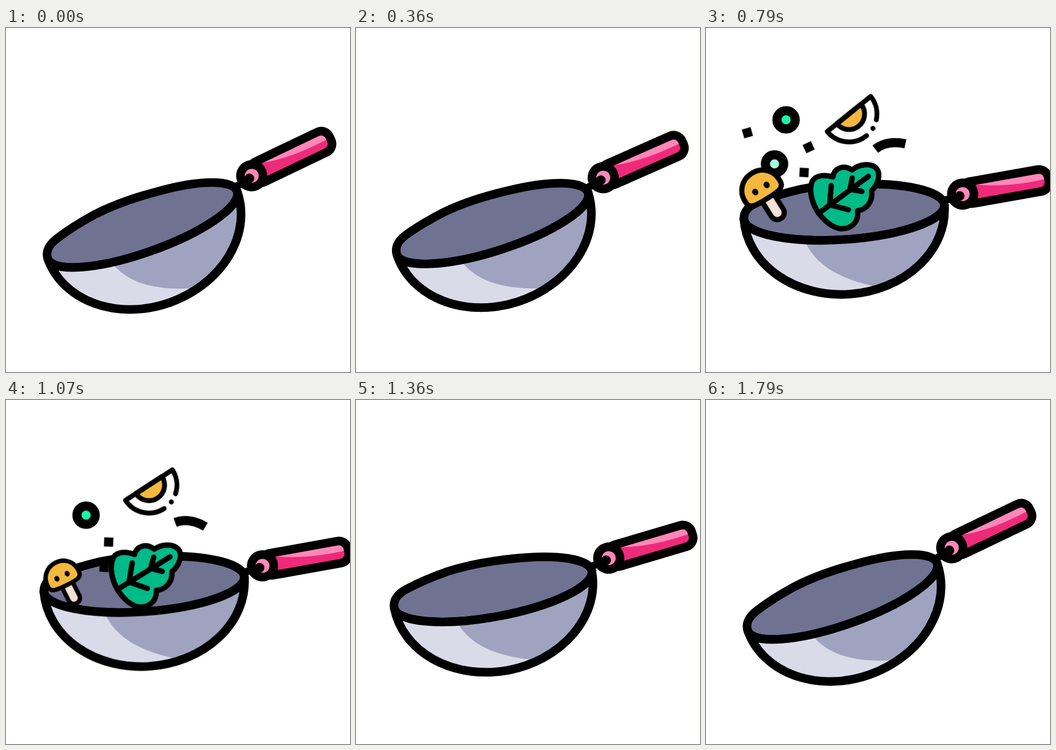
These frames come from a looping animation (640x640 px, 1.87 s). An HTML page without scripts:

```html
<!DOCTYPE html>
<html lang="en">
<head>
<meta charset="utf-8">
<title>Wok toss</title>
<style>
  html, body { margin: 0; width: 100%; height: 100%; overflow: hidden; background: #fff; }
  svg { display: block; width: 100vw; height: 100vh; }

  .line { stroke: #000; stroke-width: 16; stroke-linejoin: round; }
  .round { stroke-linecap: round; }

  .wok, .bit { animation: 1870ms linear infinite; }
  .wok { transform-origin: 343px 366px; animation-name: swing; }
  .bit { animation-name: fly, spin, grow, show; }

  /* dip, flick up, hold, settle back */
  @keyframes swing {
    0% { rotate: -15.6deg; animation-timing-function: ease-in-out; }
    13.4% { rotate: -18.1deg; animation-timing-function: ease-in-out; }
    31%, 54% { rotate: 0deg; animation-timing-function: ease-in-out; }
    95.7%, 100% { rotate: -15.6deg; }
  }

  /* --y0 launch, --y1 peak, --y2 falling */
  @keyframes fly {
    0%, 23% { translate: calc(var(--x) + var(--dx, 0px)) calc(var(--y0) + 20px); }
    26.7% {
      translate: calc(var(--x) + var(--dx, 0px)) var(--y0);
      animation-timing-function: var(--rise, cubic-bezier(.33, .67, .67, 1));
    }
    38.5% { translate: var(--x) var(--y1); animation-timing-function: cubic-bezier(.33, 0, .67, .33); }
    57.2% { translate: var(--x) var(--y2); }
    66.8%, 100% { translate: var(--x) calc(var(--y2) + 38px); }
  }

  /* --r resting tilt, --k amount of spin */
  @keyframes spin {
    0%, 23% { rotate: calc(var(--r, 0deg) - 17deg * var(--k, 1)); }
    26.7% { rotate: calc(var(--r, 0deg) - 13deg * var(--k, 1)); animation-timing-function: ease-out; }
    42.2% { rotate: var(--r, 0deg); }
    57.2% { rotate: calc(var(--r, 0deg) + 6deg * var(--k, 1)); }
    66.8%, 100% { rotate: calc(var(--r, 0deg) + 9deg * var(--k, 1)); }
  }

  @keyframes grow {
    0%, 23% { scale: 0; }
    26.7% { scale: var(--s, .33); }
    34%, 48% { scale: 1; }
    57.2%, 60% { scale: var(--s2, 1); }
    66.8%, 100% { scale: 0; }
  }

  @keyframes show {
    0%, 23% { opacity: 0; }
    26.7% { opacity: var(--o, .5); }
    30.5%, 61% { opacity: 1; }
    66.8%, 100% { opacity: 0; }
  }

  .egg { --x: 266px; --dx: 3px; --y0: 262px; --y1: 160px; --y2: 158px; --r: -39deg;
         --rise: cubic-bezier(.1, .75, .4, 1); }
  .leaf { --x: 260px; --dx: -6px; --y0: 332px; --y1: 313.5px; --y2: 326px; --k: .8; --o: .8; }
  .shroom { --x: 110px; --y0: 347px; --y1: 309px; --y2: 338px; --r: -32deg; --k: .9;
            --s: .68; --s2: .85; --o: 1; }
  .dash { --x: 343px; --dx: 2px; --y0: 252px; --y1: 219.5px; --y2: 231px; --k: 3; }
  .ring1 { --x: 149px; --y0: 188px; --y1: 169px; --y2: 214px; }
  .ring2 { --x: 127.5px; --y0: 265px; --y1: 251px; --y2: 296px; --s2: 0; }
  .cube { --s: 0; --k: 4.5; }
  .cube1 { --x: 77px; --y0: 212px; --y1: 193px; --y2: 238px; --r: -16deg; --s2: 0; }
  .cube2 { --x: 191px; --y0: 239px; --y1: 220px; --y2: 264px; --r: -25deg; }
  .cube3 { --x: 182.5px; --y0: 286px; --y1: 267px; --y2: 311px; --r: 3deg; --k: 0; }
</style>
</head>
<body>
<svg viewBox="0 0 640 640">
  <defs>
    <rect id="cube" x="-8.5" y="-8.5" width="17" height="17"/>
    <circle id="ring" r="17" stroke="#000" stroke-width="17"/>
  </defs>

  <g class="wok">
    <!-- handle -->
    <g transform="translate(477.5 309) rotate(-10)">
      <rect width="162" height="41.4" y="-20.7" rx="17" fill="#ee2a7b"/>
      <path d="M28 -20H160V-1Q85 3 28 -13Z" fill="#ff87b8"/>
      <rect class="line" width="162" height="41.4" y="-20.7" rx="17" fill="none"/>
      <circle class="line" r="21" fill="#ff87b8"/>
    </g>
    <path class="round" d="M446 320L472 312.5" stroke="#000" stroke-width="14"/>
    <circle cx="472" cy="312.5" r="9"/>
    <!-- inside of the bowl -->
    <path class="line" fill="#707292" d="M70.45 355.54C70 340 80 331 97 324C122 314 148 306.5 176 300
      C215 292 260 289.5 300 290A187 51 -4 0 1 443.55 329.46A187 51 -4 0 1 70.45 355.54Z"/>
  </g>

  <g class="bit cube cube1"><use href="#cube"/></g>
  <g class="bit cube cube2"><use href="#cube"/></g>
  <g class="bit cube cube3"><use href="#cube"/></g>
  <g class="bit ring1" fill="#18f7a6"><use href="#ring"/></g>
  <g class="bit ring2" fill="#a6ffe0"><use href="#ring"/></g>

  <g class="bit dash">
    <path d="M-28 5.5Q-6 -12 28 -4.5" fill="none" stroke="#000" stroke-width="17"/>
  </g>

  <g class="bit egg">
    <g class="round" fill="none" stroke="#000" stroke-width="9" stroke-linejoin="round">
      <path d="M-29 0A29 29 0 0 0 29 0Z" fill="#f4b83f"/>
      <path d="M0 52A52 52 0 0 1 -52 0H52A52 52 0 0 1 32.7 40.4"/>
    </g>
    <circle cx="17.8" cy="48.9" r="4.6"/>
  </g>

  <g class="bit leaf">
    <g class="round" transform="translate(-260 -314)" fill="none" stroke="#000" stroke-width="10" stroke-linejoin="round">
      <path fill="#00ba88" d="M210 345C198 328 192 306 196 290C199 276 216 271 236 277C238 262 254 253 272 264
        C284 254 305 250 316 260C326 270 321 290 308 303C311 322 299 338 282 340
        C285 362 268 376 248 373C234 370 220 358 210 345Z"/>
      <path d="M212 343L302 276M233 293L230 329L265 338M272 279L268 300L290 304"/>
    </g>
  </g>

  <g class="bit shroom">
    <g stroke="#000" stroke-width="9.5">
      <rect x="-11.5" y="-4" width="26" height="57" rx="12.5" fill="#f3e0d6"/>
      <path fill="#f4b83f" d="M-38 -4C-41 -30 -22 -47 0 -47C22 -47 40 -30 37 -4C35 6 28 8 0 8S-37 6 -38 -4Z"/>
    </g>
    <ellipse cx="-13" cy="-14" rx="5.5" ry="6.3"/>
    <ellipse cx="12" cy="-14" rx="5.5" ry="6.3"/>
  </g>

  <g class="wok">
    <!-- outside of the bowl -->
    <path fill="#d9dbe8" d="M70.45 355.54A187 51 -4 0 0 443.55 329.46A187 153 -4 0 1 70.45 355.54Z"/>
    <path fill="#a0a3bf" d="M183 394C198 430 232 465 325 483A187 153 -4 0 0 443.55 329.46A187 51 -4 0 1 183 394Z"/>
    <path class="line" fill="none" d="M70.45 355.54A187 51 -4 0 0 443.55 329.46A187 153 -4 0 1 70.45 355.54Z"/>
  </g>
</svg>
</body>
</html>
```
